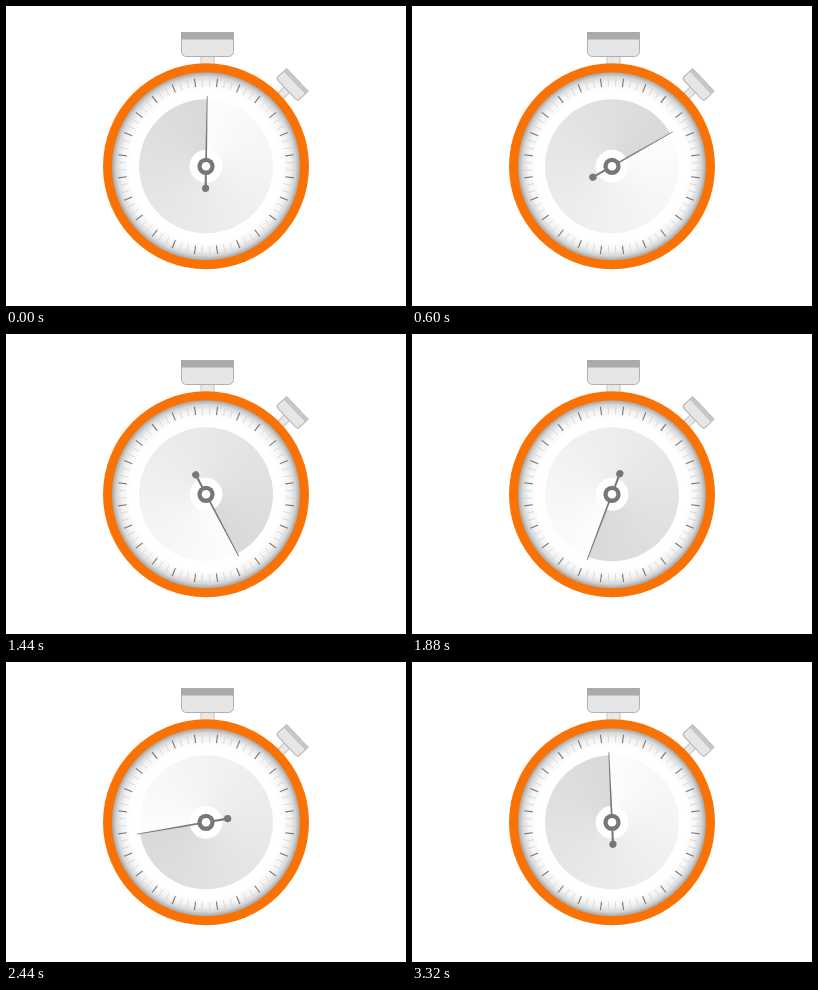
An HTML page with a canvas that plays this animation: 400 px wide and 300 px high, repeating every 3360 ms.

```html
<!DOCTYPE html>
<html lang="en">
<head>
<meta charset="utf-8">
<title>Stopwatch</title>
<style>
html, body { margin: 0; width: 100%; height: 100%; overflow: hidden; background: #fff; }
canvas { display: block; }
</style>
</head>
<body>
<canvas width="400" height="300"></canvas>
<script>
const ctx = document.querySelector('canvas').getContext('2d');
const LOOP = 3360, TAU = Math.PI * 2, DEG = Math.PI / 180;

function disc(r, fill, y = 0) {
  ctx.beginPath();
  ctx.arc(0, y, r, 0, TAU);
  ctx.fillStyle = fill;
  ctx.fill();
}

function box(x, y, w, h, radii, fill, stroke) {
  ctx.beginPath();
  ctx.roundRect(x, y, w, h, radii);
  ctx.fillStyle = fill;
  ctx.fill();
  ctx.strokeStyle = stroke;
  ctx.stroke();
}

// Draws a push button; the origin is the middle of its outer edge.
function button(angle, dist, x, scale, bar, stem) {
  ctx.save();
  ctx.rotate(angle * DEG);
  ctx.translate(x, -dist);
  ctx.scale(scale, scale);
  ctx.lineWidth = 1 / scale;
  box(-6.5, 20, 13, stem, 0, '#e8e8e8', '#c2c2c2');
  box(-26, 0.5, 52, 24, [0, 0, 5, 5], '#e6e6e6', '#b0b0b0');
  ctx.fillStyle = bar;
  ctx.fillRect(-26.5, 0, 53, 7.5);
  ctx.restore();
}

function ticks() {
  for (let i = 0; i < 72; i++) {
    const major = i % 3 === 0;
    ctx.save();
    ctx.rotate((7.5 + i * 5) * DEG);
    ctx.beginPath();
    ctx.moveTo(0, -80);
    ctx.lineTo(0, -88.5);
    ctx.lineWidth = major ? 1.1 : 0.7;
    ctx.strokeStyle = major ? '#777' : '#d0d0d0';
    ctx.stroke();
    ctx.restore();
  }
}

function hand(angle) {
  ctx.save();
  ctx.rotate(angle);
  ctx.beginPath();
  ctx.moveTo(-0.4, -70);
  ctx.lineTo(0.4, -70);
  ctx.lineTo(1.1, 22);
  ctx.lineTo(-1.1, 22);
  ctx.fillStyle = '#777';
  ctx.fill();
  disc(3.6, '#777', 22);
  ctx.restore();
}

function draw(t) {
  // The hand jumps in steps of about 50 ms, shown on a 40 ms clock.
  const tick = Math.floor(t / 40 + 1e-6) * 40;
  const step = Math.max(0, Math.floor((tick - 13) / 49.9));
  const angle = (1 + 5.4 * step) * DEG;

  ctx.clearRect(0, 0, 400, 300);
  ctx.save();
  ctx.translate(200, 160.3);
  button(0, 134.3, 1.5, 1, '#aaa', 15);
  button(46.6, 126, 0, 0.6, '#c6c6c6', 22);
  disc(103, '#fa7203');

  const face = ctx.createRadialGradient(0, 0, 76, 0, 0, 94);
  face.addColorStop(0, '#fff');
  face.addColorStop(0.45, '#f4f4f4');
  face.addColorStop(0.75, '#d8d8d8');
  face.addColorStop(1, '#a6a6a6');
  disc(94, face);
  ticks();

  const sweep = ctx.createConicGradient(angle - TAU / 4, 0, 0);
  sweep.addColorStop(0, '#fdfdfd');
  sweep.addColorStop(1, '#d9d9d9');
  disc(67, sweep);
  disc(16.5, '#fff');
  hand(angle);
  disc(8.6, '#777');
  disc(4.3, '#fff');
  ctx.restore();
}

function frame() {
  draw(performance.now() % LOOP);
  requestAnimationFrame(frame);
}
frame();
</script>
</body>
</html>
```
